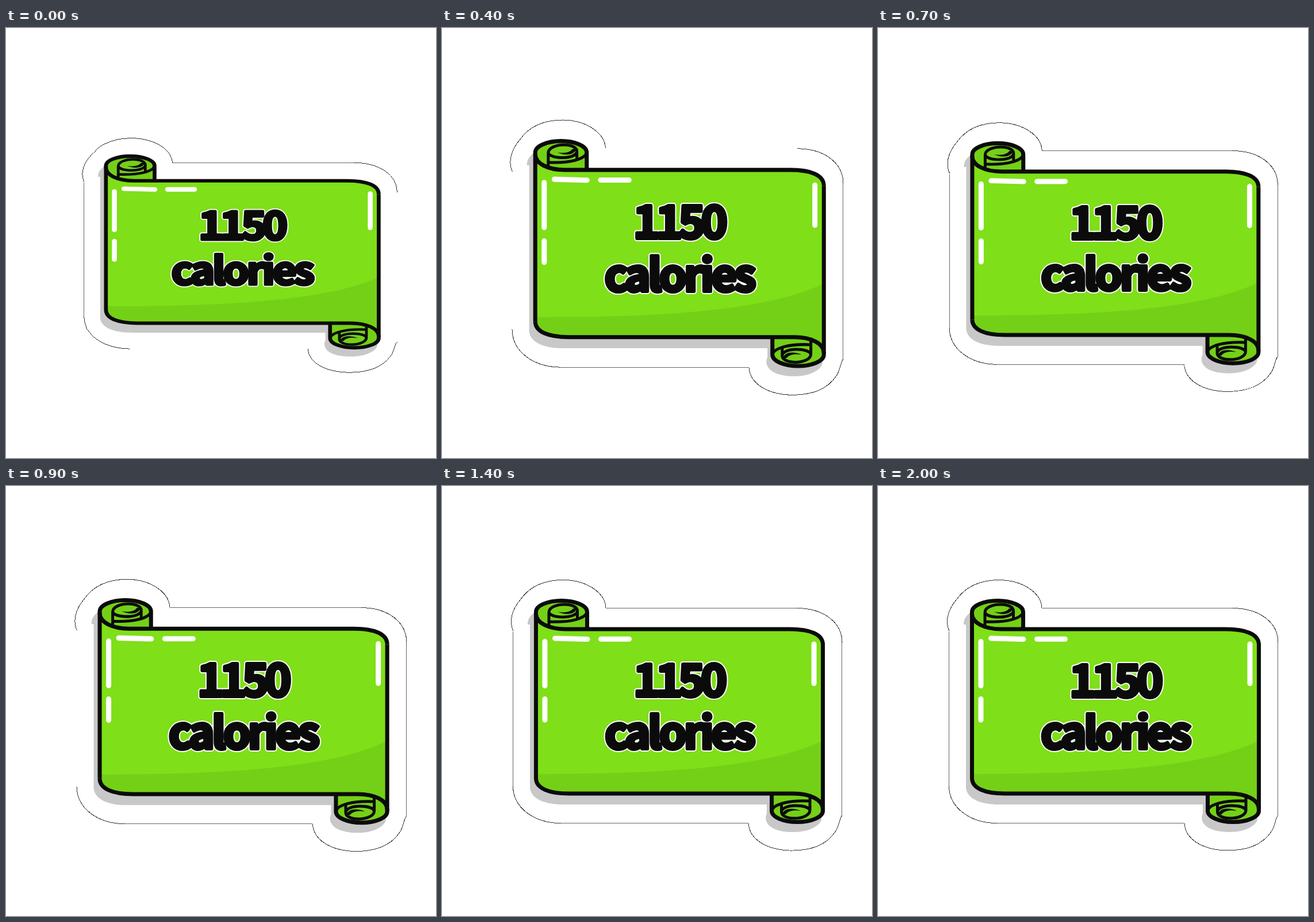
Recreate the animation shown at these times as an HTML page. Size 748 by 748 pixels, loop 2.1 s.

```html
<!DOCTYPE html>
<html lang="en">
<head>
<meta charset="utf-8">
<title>Calorie banner</title>
<style>
  html, body { margin: 0; width: 100%; height: 100%; overflow: hidden; background: #fff; }
  svg { display: block; width: 100vw; height: 100vh; }
  .ink { fill: none; stroke: #0b0b0b; stroke-width: 7; stroke-linejoin: round; }
  .curl { stroke-width: 5; }
  .gloss { fill: none; stroke: #fff; stroke-width: 9; stroke-linecap: round; }
  .cut { fill: none; stroke: #333; stroke-width: 1; shape-rendering: crispEdges; vector-effect: non-scaling-stroke; }
  text { font-family: "Noto Sans CJK JP", "Noto Sans CJK SC", "Noto Sans", sans-serif; font-weight: 700;
         text-anchor: middle; stroke-linejoin: round; }
  .digits { font-size: 78px; letter-spacing: -7px; }
  .word { font-size: 76px; letter-spacing: -4.5px; }
  .halo { fill: #fff; stroke: #fff; stroke-width: 10; }
  .face { fill: #0b0b0b; stroke: #0b0b0b; stroke-width: 6; }
</style>
</head>
<body>
<svg viewBox="0 0 748 748">
  <defs>
    <path id="edge" d="M163.5 508V222C163.5 238 185 249 215 249H605C640 249 662.5 258 662.5 276"/>
    <path id="sheet" d="M163.5 508V222C163.5 238 185 249 215 249H605C640 249 662.5 258 662.5 276V562C662.5 546 641 535 611 535H221C186 535 163.5 526 163.5 508Z"/>
    <clipPath id="sheetClip"><use href="#sheet"/></clipPath>
    <g id="roll">
      <path fill="#74d017" d="M163.5 219A44.5 19.5 0 0 1 252.500 219V249H215C185 249 163.5 238 163.5 222Z"/>
      <path class="ink" d="M163.5 224V219A44.5 19.5 0 0 1 252.5 219V249"/>
      <path class="ink curl" d="M252.5 219C250 230 225 238 186 236"/>
      <path class="ink curl" d="M186 242V220C186 211 200 206 213 206C227 206 235.5 211 235.5 217C235.5 224 224 228 211 228C198 228 188 225 186 220M235.5 217V230"/>
      <path fill="#0b0b0b" d="M234 213C232 224 215 225 202 219C214 221 224 219 228 213Z"/>
    </g>
    <g id="lettering">
      <text class="digits" x="411" y="366.5">1150</text>
      <text class="word" x="412" y="457">calories</text>
    </g>
  </defs>

  <g id="banner">
    <path fill="#c8c8c8" d="M165 218C153 224 149 232 149 241H153V525C155 545 180 554 210 554H565V570C560 578 562 602 612 602C640 602 658 590 660 580V400H165Z"/>
    <use href="#sheet" fill="#7fdf18"/>
    <path clip-path="url(#sheetClip)" fill="#74d017" d="M160 501C330 501 560 496 664 442V570H160Z"/>
    <use href="#roll"/>
    <use href="#roll" transform="rotate(180 413 392)"/>
    <use href="#edge" class="ink"/>
    <use href="#edge" class="ink" transform="rotate(180 413 392)"/>
    <path class="gloss" d="M179 270.5V347.5M179 370.5V407M196.5 265L253 266.5M276.5 266.3H325.5M647 275V343.5"/>
    <use href="#lettering" class="halo"/>
    <use href="#lettering" class="face"/>
    <path class="cut" d="M124 252C117 237 120 217 137 197C154 173 180 163.5 212 163.5C252 164 284 186 285 212M617 212.5C665 213 696 238 696 272M696 573C691 578 692 588 685 600C668 626 640 634 607 634C565 633 535 615 533 587M207 586.6C160 586 124 560 123.5 522"/>
  </g>
  <g id="rims"></g>
</svg>
<script>
const LOOP = 2100, STEP = 100, MID = 374;
const banner = document.getElementById("banner");
const rimLayer = document.getElementById("rims");

// Straight cut lines: offset from the middle along one axis, span along the other.
const rims = [
  { axis: "y", offset: -161.4, from: 285, to: 617 },
  { axis: "y", offset: 212.6, from: 207, to: 533 },
  { axis: "x", offset: -250.5, from: 253, to: 523 },
  { axis: "x", offset: 321.9, from: 271, to: 573 }
].map(rim => {
  const node = document.createElementNS("http://www.w3.org/2000/svg", "path");
  node.setAttribute("class", "cut");
  rimLayer.append(node);
  return { ...rim, node };
});

// Elastic settling, from -1 towards 0.
const elastic = s => s >= 2 ? 0 : -(2 ** (-5 * s)) * Math.cos(2 * Math.PI * s / 0.6);

function drawRim({ axis, offset, from, to, node }, scale) {
  const across = axis === "x" ? "y" : "x";
  const place = v => MID + (v - MID) * scale[across];
  const pos = MID + offset * scale[axis];
  const pixel = Math.floor(pos);
  const part = pos - pixel;
  // A rim that covers too little of its pixel vanishes.
  const cover = offset < 0 ? 1 - part : part;
  node.setAttribute("opacity", cover < 0.13 ? 0 : 0.75);
  node.setAttribute("d", axis === "x"
    ? `M${pixel + 0.5} ${place(from)}V${place(to)}`
    : `M${place(from)} ${pixel + 0.5}H${place(to)}`);
}

function render(ms) {
  const t = Math.floor(ms % LOOP / STEP) * STEP;
  const swing = elastic(t / 1000);
  const scale = { x: 1 + 0.049 * swing, y: 1 + 0.134 * swing };
  banner.setAttribute("transform",
    `translate(${MID} ${MID}) scale(${scale.x} ${scale.y}) translate(${-MID} ${-MID})`);
  rims.forEach(rim => drawRim(rim, scale));
}

const start = performance.now();
function tick() {
  render(performance.now() - start);
  requestAnimationFrame(tick);
}
tick();
</script>
</body>
</html>
```
